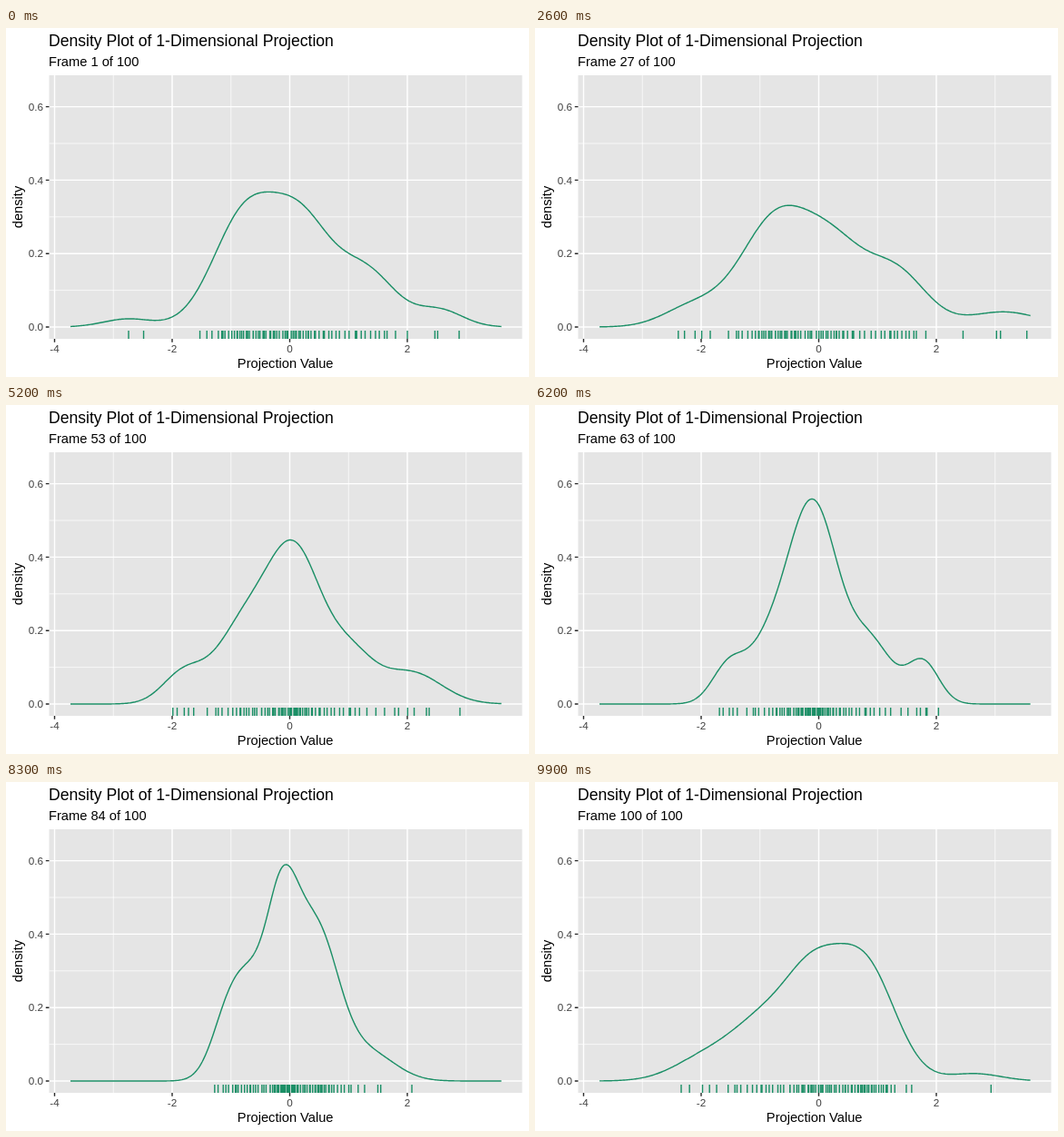
Write an HTML page that moves like this. It is 576x384 px and loops after 10000 ms.

```html
<!DOCTYPE html>
<html lang="en">
<head>
<meta charset="utf-8">
<title>Density Plot</title>
<style>
  html, body { margin: 0; width: 100%; height: 100%; overflow: hidden; background: #fff; }
  svg { display: block; width: 576px; height: 384px; font-family: "Liberation Sans", Arial, sans-serif; }
  .label { font-size: 11.73px; fill: #404040; }
  .name { font-size: 14.67px; text-anchor: middle; }
  .data { fill: none; stroke: #1b8f66; stroke-width: 1.42; }
</style>
</head>
<body>
<svg viewBox="0 0 576 384">
  <rect width="576" height="384" fill="#fff"/>
  <rect x="47.5" y="52" width="521" height="290" fill="#e5e5e5"/>
  <path id="minor" stroke="#fff" stroke-width=".71"/>
  <path id="major" stroke="#fff" stroke-width="1.42"/>
  <path id="curve" class="data" stroke-linejoin="round"/>
  <path id="rug" class="data"/>
  <path id="ticks" stroke="#292929" stroke-width="1.42"/>
  <g id="labels" class="label"></g>
  <text x="47" y="20" font-size="17.6">Density Plot of 1-Dimensional Projection</text>
  <text id="subtitle" x="47" y="42" font-size="14.67"></text>
  <text class="name" x="307.7" y="374">Projection Value</text>
  <text class="name" transform="translate(17.5 197) rotate(-90)">density</text>
</svg>
<script>
const FRAMES = 100, FRAME_MS = 100, POINTS = 74;
const MIN = -3.73, MAX = 3.6, SAMPLES = 360;
const get = id => document.getElementById(id);
const px = v => 312.5 + 64.75 * v;
const py = d => 329 - 404 * d;
const mix = (a, b, u) => a + (b - a) * u;
const random = seed => Math.abs(Math.sin(seed * 127.1 + 3.7) * 43758.5453) % 1;
const grid = Array.from({ length: SAMPLES + 1 }, (_, i) => mix(MIN, MAX, i / SAMPLES));

// Each pose is a sum of five bell curves: [center, width, height]
const poses = [
  { step: 0, bells: [[-2.75, .42, .022], [-.75, .55, .305], [.22, .5, .255], [1.3, .5, .148], [2.55, .4, .045]] },
  { step: 11, bells: [[-2.8, .7, .02], [-.75, .62, .32], [.33, .5, .18], [1.4, .53, .15], [3, .42, .045]] },
  { step: 26, bells: [[-2.15, .5, .053], [-.7, .62, .3], [.3, .5, .165], [1.3, .52, .15], [3.15, .6, .041]] },
  { step: 43, bells: [[-2.05, .42, .068], [-.68, .57, .275], [.26, .48, .27], [1.15, .42, .09], [2.3, .75, .062]] },
  { step: 62, bells: [[-1.55, .28, .095], [-.9, .37, .125], [-.1, .43, .54], [.9, .37, .155], [1.78, .27, .113]] },
  { step: 83, bells: [[-1.15, .25, .06], [-.75, .35, .27], [-.13, .27, .4], [.45, .38, .4], [1.35, .45, .075]] },
  { step: 99, bells: [[-1.9, .55, .065], [-1, .5, .13], [-.1, .5, .275], [.82, .5, .292], [2.65, .45, .02]] }
];

function drawAxes() {
  const vertical = v => `M${px(v)} 52V342`;
  const horizontal = d => `M47.5 ${py(d)}H568.5`;
  const xs = [-4, -2, 0, 2], ys = [0, .2, .4, .6];
  get("major").setAttribute("d", xs.map(vertical).join("") + ys.map(horizontal).join(""));
  get("minor").setAttribute("d", [-3, -1, 1, 3].map(vertical).join("") + [.1, .3, .5].map(horizontal).join(""));
  get("ticks").setAttribute("d",
    xs.map(v => `M${px(v)} 342v3.7`).join("") + ys.map(d => `M43.8 ${py(d)}h3.7`).join(""));
  get("labels").innerHTML =
    xs.map(v => `<text x="${px(v)}" y="357" text-anchor="middle">${v}</text>`).join("") +
    ys.map(d => `<text x="41" y="${py(d) + 4.2}" text-anchor="end">${d.toFixed(1)}</text>`).join("");
}

// Blend neighbouring poses; the projection is narrowest around step 72
function bellsAt(step) {
  const next = Math.max(1, poses.findIndex(p => p.step >= step));
  const a = poses[next - 1], b = poses[next];
  const u = (step - a.step) / (b.step - a.step);
  const squeeze = 1 + .2 * Math.exp(-(((step - 72) / 5) ** 2));
  return a.bells.map((bell, i) => {
    const [center, width, height] = bell.map((v, j) => mix(v, b.bells[i][j], u));
    return [center / squeeze, width / squeeze, height * squeeze];
  });
}

const density = (bells, x) =>
  bells.reduce((sum, [c, w, h]) => sum + h * Math.exp(-(((x - c) / w) ** 2) / 2), 0);

// Undo the smoothing of the curve to get the spread of the single points
function sharpen(bells) {
  const bandwidth = .85 * Math.min(...bells.map(b => b[1]));
  return bells.map(([c, w, h]) => {
    const narrow = Math.sqrt(w * w - bandwidth * bandwidth);
    return [c, narrow, h * w / narrow];
  });
}

// One mark at a random place within each equal share of the points
function rugMarks(bells) {
  const weights = grid.map(x => density(bells, x));
  const share = weights.reduce((a, b) => a + b) / POINTS;
  const marks = [];
  let sum = 0;
  weights.forEach((weight, i) => {
    const before = sum;
    sum += weight;
    for (let k = marks.length; k < POINTS; k++) {
      const goal = share * (k + random(k));
      if (goal >= sum) break;
      marks.push(grid[i] + (goal - before) / weight * (MAX - MIN) / SAMPLES);
    }
  });
  return marks;
}

function draw(step) {
  const bells = bellsAt(step);
  const points = grid.map(x => `${px(x).toFixed(2)} ${py(density(bells, x)).toFixed(2)}`);
  get("curve").setAttribute("d", "M" + points.join("L"));
  get("rug").setAttribute("d", rugMarks(sharpen(bells)).map(v => `M${px(v).toFixed(2)} 342v-9`).join(""));
  get("subtitle").textContent = `Frame ${step + 1} of ${FRAMES}`;
}

drawAxes();
draw(0);
let start;
function tick(now) {
  start ??= now;
  draw(Math.floor((now - start) / FRAME_MS) % FRAMES);
  requestAnimationFrame(tick);
}
requestAnimationFrame(tick);
</script>
</body>
</html>
```
